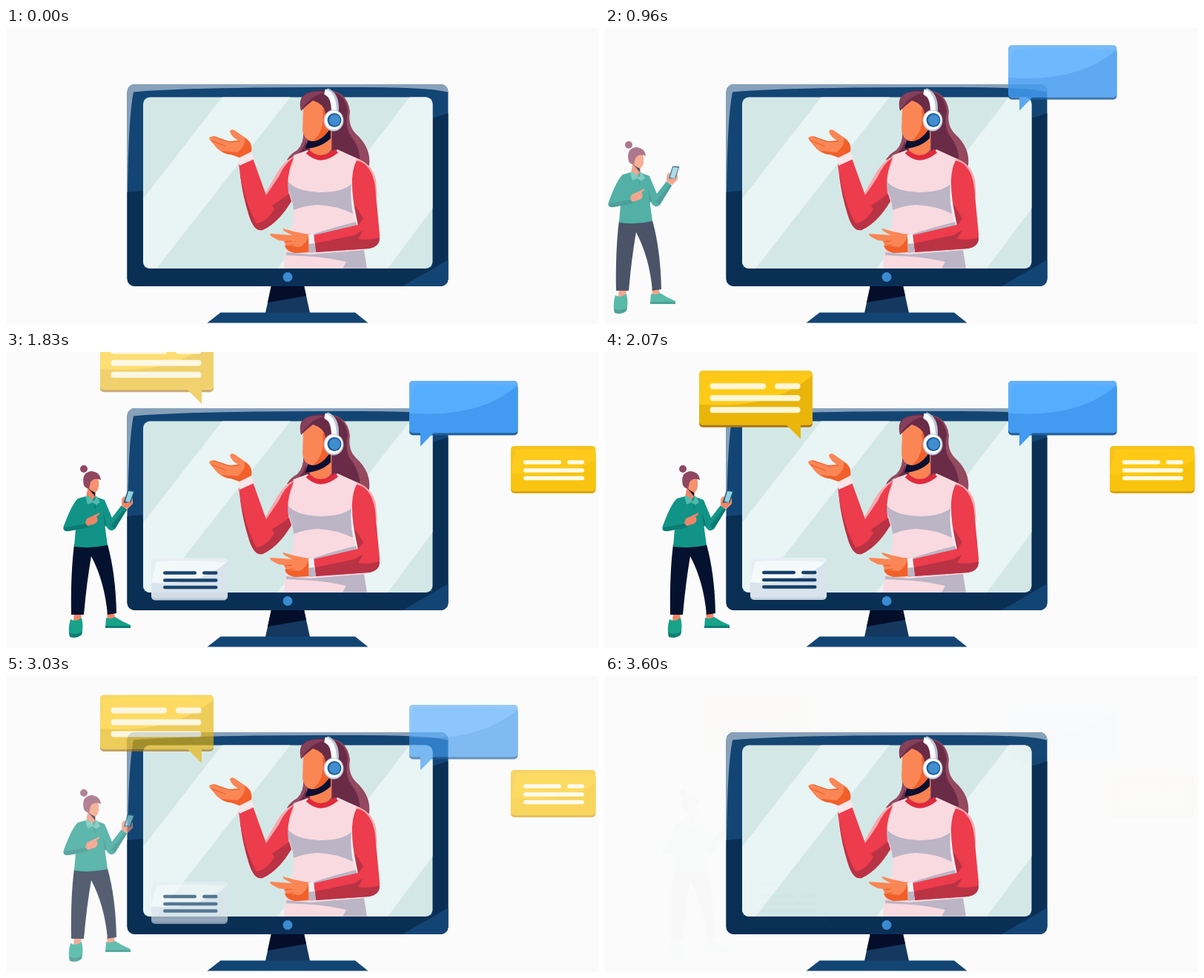
An HTML page that plays this animation: 800 px wide and 400 px high, repeating every 3.63 s.

```html
<!DOCTYPE html>
<html lang="en">
<head>
<meta charset="utf-8">
<title>Video call</title>
<style>
html, body { margin: 0; width: 100%; height: 100%; overflow: hidden; background: #fbfbfb; }
svg { display: block; width: 800px; height: 400px; }
</style>
</head>
<body>
<svg viewBox="0 0 800 400">
  <defs>
    <clipPath id="case"><rect x="163.500" y="76" width="433" height="273" rx="10"/></clipPath>
    <clipPath id="screen"><rect x="185" y="93.500" width="390.500" height="231.500" rx="9"/></clipPath>
    <clipPath id="aboveBezel"><rect x="185" y="70" width="390" height="254.500"/></clipPath>
  </defs>

  <!-- monitor -->
  <path fill="#14385f" d="M358 348H402L410 385H350Z"/>
  <path fill="#040e2b" d="M358 348H402L405 362L353 371Z"/>
  <path fill="#134574" d="M289.500 384.500H471L488.500 398.500H271.500Z"/>
  <g clip-path="url(#case)">
    <path fill="#134574" d="M160 70H600V350H160Z"/>
    <path fill="#0a2f55" d="M163 222L186 220V324H575V122L597 115V350H163Z"/>
    <path fill="#134574" d="M535 349L597 313V350Z"/>
    <path fill="#87a1ba" d="M163 222V75H597V87Q575 80 480 80Q260 79 172 86.500Q165 122 164 222Z"/>
  </g>
  <g clip-path="url(#screen)">
    <path fill="#d3e8e6" d="M180 90H580V330H180Z"/>
    <path fill="#e9f4f4" d="M292 93H384L203 325H184V232ZM545 93H576V243L515 325H366Z"/>
  </g>
  <circle cx="380" cy="336.500" r="6.500" fill="#398bd2"/>

  <!-- presenter -->
  <g clip-path="url(#aboveBezel)">
    <path fill="#94495f" d="M430 84Q461 84 464 113Q461 132 472 143Q493 162 490 186L400 186L379 178Q384 170 393 165Q402 156 401 140L405 100Z"/>
    <path fill="#6a2b47" d="M431 85Q458 85 461 112Q457 132 464 144Q479 163 477 182L440 180V110ZM404 154Q402 162 396 168L412 170Z"/>
    <path fill="#f98252" d="M412 145L439 134V164Q432 174 420 173L410 167Z"/>
    <path fill="#0a102f" d="M407 152Q420 154 438 135V149Q425 162 404 163Z"/>
    <path fill="#fb8655" d="M401 106L412 93H436V137Q424 154 412 153Q401 150 400 138Z"/>
    <path fill="#f1602b" d="M427 110L436 108V138Q425 153 413 153Q431 141 427 110Z"/>
    <path fill="#6a2b47" d="M398 112Q393 92 408 87Q430 80 444 91L441 118L431 116Q430 103 414 98Q406 104 398 112Z"/>
    <path fill="#85405b" d="M398 111Q394 94 407 88Q421 84 431 87Q412 90 398 111Z"/>

    <path fill="#f9dae0" d="M388 172L407 165Q426 186 447 164L469 174Q483 179 488 189L466 212Q464 236 473 267L487 325H375Q376 300 385 274Q391 252 386 238Q373 210 388 172Z"/>
    <path fill="#bbb5c5" d="M379 205Q387 220 423 222Q454 222 466 211Q464 232 468 251Q446 240 420 239Q402 240 388 246Q387 232 380 217ZM385 279L416 278Q447 268 472 262L476 272L410 289L383 286ZM378 303L410 306L483 300L487 325H454L459 316Q438 311 415 309L378 307Z"/>
    <path fill="none" stroke="#e1293c" stroke-width="6.500" d="M407 167Q424 184 446 166"/>

    <!-- raised arm -->
    <path fill="#f7a9af" d="M389 173Q376 179 366 195L350 223L352 230L386 185Z"/>
    <path fill="#ed3c4b" d="M388 175Q375 184 368 201L351 226L333 176L314 184Q318 222 328 254Q335 275 346 273Q367 264 385 234Q374 211 388 175Z"/>
    <path fill="#b93345" d="M316 198Q324 240 338 264Q352 262 362 245L359 240L382 224L385 234Q367 264 346 273Q335 276 328 254Q319 226 316 198Z"/>
    <path fill="#fae5e8" d="M313 176L331 167L335 177L315 186Z"/>
    <path fill="#fb8655" d="M331 167Q333 154 321 147L308 138Q303 136 302 140Q304 147 313 152L300 153L280 146Q272 147 275 151L285 163Q294 171 303 171L315 175Z"/>
    <path fill="#f1602b" d="M331 167Q333 154 322 149Q324 160 312 168L291 166Q297 171 304 171L315 175Z"/>
    <path fill="none" stroke="#e85a27" d="M277 152L297 160M281 147L302 154L315 153"/>

    <!-- folded arm -->
    <path fill="#f7a9af" d="M471 176Q493 181 499 205L501 230L488 190Z"/>
    <path fill="#ed3c4b" d="M473 179Q493 183 498 214L504 278Q505 295 490 298L417 303L415 280L475 266Q466 230 467 204Q468 188 473 179Z"/>
    <path fill="#b93345" d="M417 291L446 285L470 280L482 273L475 285Q492 287 504 283Q505 295 490 298L417 303ZM470 238L482 257L475 267Z"/>
    <path fill="#f4f0f4" d="M407 279L415 278L418 303L409 304Z"/>
    <path fill="#bbb5c5" d="M408 292L416 291L418 303L409 304Z"/>
    <path fill="#fb8655" d="M408 279L388 275L374 271Q371 273 386 280L357 278Q353 280 368 287L376 288Q376 300 390 304L409 303Z"/>
    <path fill="#f1602b" d="M408 281V303L390 304Q378 302 376 294L396 296Q405 292 408 281Z"/>
    <path fill="none" stroke="#e85a27" d="M375 289L386 288M378 295L388 293"/>
  </g>

  <!-- headset -->
  <path fill="none" stroke="#b9c3d6" stroke-width="10" d="M432 86Q445 91 444 112"/>
  <path fill="none" stroke="#fff" stroke-width="7" d="M430 86Q442 89 442.500 112"/>
  <ellipse cx="442" cy="125" rx="13.500" ry="14.500" fill="#bdc8db"/>
  <ellipse cx="442" cy="124.500" rx="12" ry="13" fill="#fff"/>
  <circle cx="443" cy="124.500" r="9.500" fill="#1f5d99"/>
  <circle cx="443.500" cy="124.500" r="7.500" fill="#408ed0"/>

  <!-- visitor -->
  <g id="visitor">
    <path fill="#ee8566" d="M92 352H102L101 364H91ZM136 352H146L147 361H137Z"/>
    <path fill="#17a28a" d="M87 361Q94 366 102 359Q105 371 102 382Q95 388 86 384Q83 374 87 361ZM135 359Q141 362 147 358Q156 364 168 369V373H134Z"/>
    <path fill="#0d7f72" d="M85 379Q94 384 103 377L102 382Q95 388 86 385ZM134 370H168V373H134Z"/>
    <path fill="#05122f" d="M92 260H137Q148 300 149 353L137 355Q133 310 115 276Q109 310 105 355H88Q87 300 92 260Z"/>
    <circle cx="105" cy="158" r="5" fill="#8f4661"/>
    <path fill="#ee8566" d="M111 180L121 183V198L113 202L108 196Z"/>
    <path fill="#0a102f" d="M111 184L120 190V195Z"/>
    <path fill="#f6926f" d="M110 174L124 170Q127 181 123 188Q117 191 112 184Z"/>
    <path fill="#8f4661" d="M105 180Q101 163 115 161Q127 162 128 173Q119 169 114 176L112 185Q107 184 105 180Z"/>
    <path fill="#119487" d="M108 195L97 198Q89 205 78 235Q75 243 85 242L94 239L92 263Q115 266 137 261L133 232Q140 246 147 239L163 213L156 207L143 224L133 200L120 195L115 202Z"/>
    <path fill="#0b7b73" d="M79 237L108 232L112 237L85 242Q77 243 79 237ZM131 216L136 234L133 236ZM141 235L161 211L163 213L147 239Z"/>
    <path fill="#56b9ac" d="M107 195L111 194L119 202L122 194L127 203L121 207L117 203L110 206Z"/>
    <path fill="none" stroke="#0b6d68" d="M120 205V212"/>
    <path fill="#ee8566" d="M109 225L116 222L126 217Q127 220 122 222Q126 228 120 232L110 235L107 231Z"/>
    <path fill="#f6926f" d="M156 208L156 199L159 195L165 199L171 198V205L164 212Z"/>
    <path fill="#1c567f" d="M164 187Q164 186 173 187Q174 187 173 189L168 205Q167 207 159 204Q158 203 159 202Z"/>
    <path fill="#94d2dd" d="M165 188L172 189L167 203L161 202Z"/>
    <path fill="#ee8566" d="M157 204L168 203L166 209L160 211Z"/>
  </g>
  <g id="cards"></g>
</svg>
<script>
const $ = id => document.getElementById(id);
const clamp = v => Math.min(1, Math.max(0, v));

// Rows of text bars: one split row followed by two full rows.
function bars(x, split, next, end, ys, width, color) {
  const r = width / 2, bar = (a, b, y) => `M${a + r} ${y}H${b - r}`;
  const d = bar(x, split, ys[0]) + bar(next, end, ys[0]) + bar(x, end, ys[1]) + bar(x, end, ys[2]);
  return `<path d="${d}" stroke="${color}" stroke-width="${width}" stroke-linecap="round"/>`;
}

// A glossy panel: edge, face, shaded lower part, lit rim, then tail and text.
function card(id, x, y, w, h, [face, shade, rim, edge], rise, tail = '', text = '') {
  const r = x + w, b = y + h;
  return `<g id="${id}">
    <clipPath id="${id}Clip"><rect x="${x}" y="${y}" width="${w}" height="${h}" rx="5"/></clipPath>
    <rect x="${x}" y="${y + 5}" width="${w}" height="${h - 2}" rx="5" fill="${edge}"/>
    <path d="${tail}" fill="${shade}"/>
    <g clip-path="url(#${id}Clip)">
      <path d="M${x} ${y}H${r}V${b}H${x}Z" fill="${face}"/>
      <path d="M${x} ${y + h * .62}Q${x + w * .65} ${y + h * .72} ${r} ${y + h * rise}V${b}H${x}Z" fill="${shade}"/>
      <path d="M${x} ${y + h * .6}V${y}H${r}V${y + 6}Q${x + w * .5} ${y + 2} ${x + 7} ${y + 5}Z" fill="${rim}"/>
    </g>${text}</g>`;
}

$('cards').innerHTML =
  card('blue', 544, 39, 146.5, 70.5, ['#55adff', '#429bf0', '#63b0f8', '#215d9b'], .08, 'M559 108H578L559 127.500Z') +
  card('white', 196, 278, 103, 54, ['#f4f9fa', '#d9e3ec', '#e6eff3', '#c5d0dc'], .08, '',
    bars(212, 257, 265, 285.5, [298, 308, 317.5], 4.5, '#153f69')) +
  card('note', 681, 127, 114.5, 61, ['#ffca17', '#f8c30d', '#f6c31c', '#d9a40c'], .3, '',
    bars(698, 749, 757, 780, [149, 160, 170.5], 5.5, '#fffbe8')) +
  card('gold', 127, 25.5, 153, 73.5, ['#ffca17', '#e9b50b', '#f8c81c', '#a97518'], .08, 'M244 98H264V118Z',
    bars(141.5, 217, 229, 263.5, [46.5, 62.5, 78.5], 8, '#fff6d5'));

// Each part slides in from just outside the stage: start, end, dx, dy, fade rate.
const parts = {
  blue: [165, 1197, 0, -127, 1.1],
  visitor: [180, 1540, -190, 0, 1.25],
  white: [1100, 1858, 0, 122, 1],
  note: [1219, 1843, 119, 0, 1],
  gold: [1500, 2090, 0, -118, 1.05]
};

function draw(now) {
  const t = now % 3630, out = clamp((3607 - t) / 862);
  for (const [id, [start, end, dx, dy, rate]] of Object.entries(parts)) {
    const p = clamp((t - start) / (end - start));
    const left = (1 + Math.cos(Math.PI * p)) / 2;
    const el = $(id);
    el.setAttribute('transform', `translate(${dx * left} ${dy * left})`);
    el.setAttribute('opacity', clamp(p * rate) * out);
  }
}

const begin = performance.now();
(function tick() {
  draw(performance.now() - begin);
  requestAnimationFrame(tick);
})();
</script>
</body>
</html>
```
